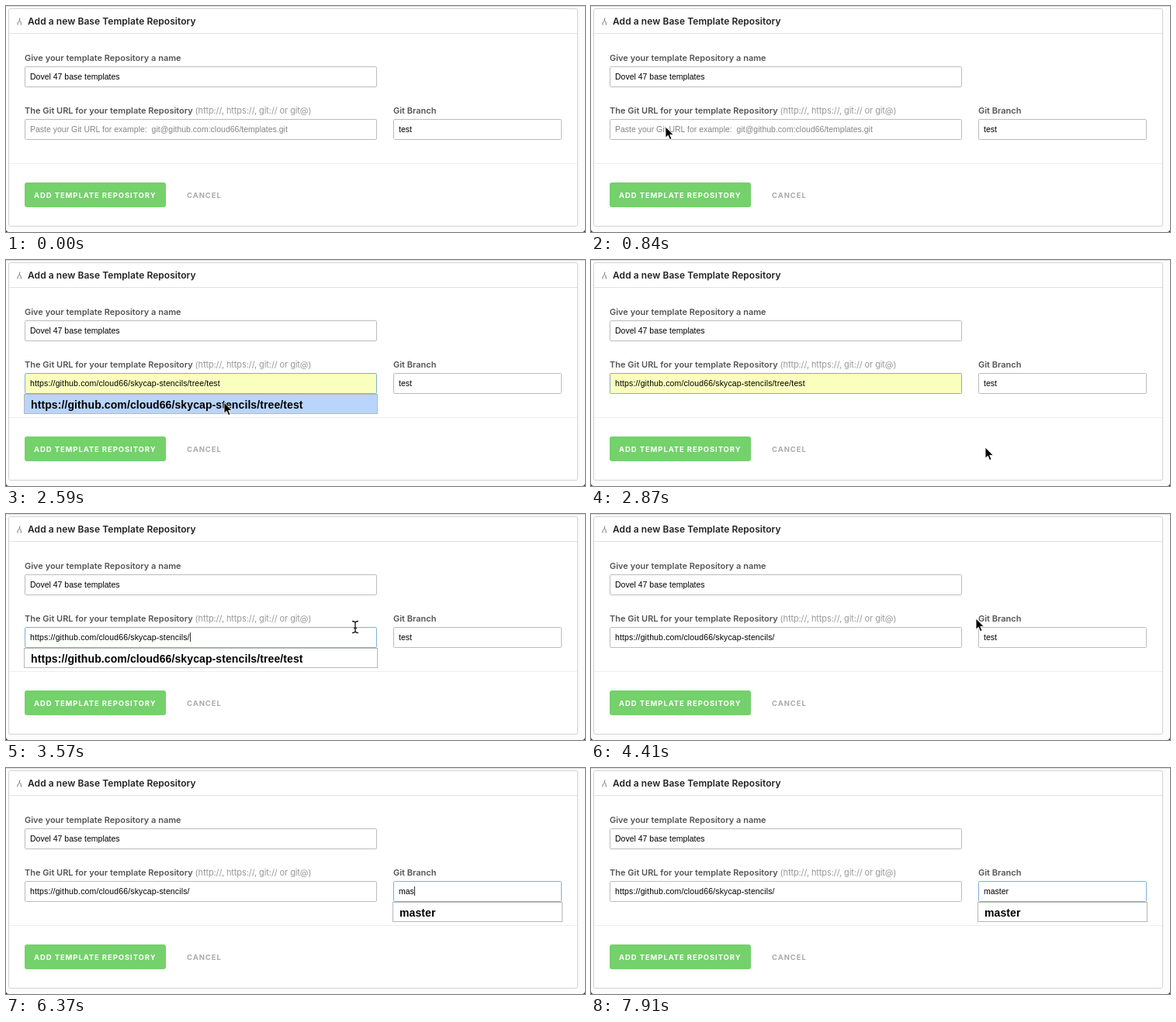
An HTML page for the animation above (8 s loop, 746x292 px).

```html
<!DOCTYPE html>
<html lang="en">
<head>
<meta charset="utf-8">
<title>Add a new Base Template Repository</title>
<style>
  html, body { margin: 0; width: 100%; height: 100%; overflow: hidden; background: #fff; }
  svg { display: block; }
  text { white-space: pre; }
  .title { font: 600 12px Inter, sans-serif; letter-spacing: .06px; fill: #222; }
  .label { font: 600 11px Inter, sans-serif; fill: #555; }
  .hint { font-weight: 400; letter-spacing: -.1px; fill: #999; }
  .value { font: 10.5px "Liberation Sans", Arial, sans-serif; fill: #000; }
  .option { font: bold 14px "Liberation Sans", Arial, sans-serif; letter-spacing: .1px; }
  .button { font: 700 9.5px Inter, sans-serif; letter-spacing: .9px; }
  .field { fill: #fff; stroke: #bcbcbc; }
  .focus { stroke: #82addb; }
</style>
</head>
<body>
<svg width="746" height="292" viewBox="0 0 746 292">
  <rect width="746" height="292" fill="#fcfcfc"/>
  <path d="M0 .5H746" stroke="#ddd"/>
  <path d="M0 288V292H4Q0 292 0 288ZM746 288V292H742Q746 292 746 288Z" fill="#333"/>
  <rect x="3.5" y="3.5" width="733" height="281" rx="2" fill="#fff" stroke="#d2d2d2"/>
  <path d="M4 35.5H736" stroke="#e0e0e0"/>
  <path d="M4 203.5H736" stroke="#eee"/>
  <path d="M15 24.5V22Q17.5 20 18 15.5M17.5 18.5Q19.5 20 19.5 24.5" fill="none" stroke="#777"/>
  <text class="title" x="28" y="24">Add a new Base Template Repository</text>

  <text class="label" x="24" y="71">Give your template Repository a name</text>
  <rect class="field" x="24.5" y="78.5" width="453" height="26" rx="1"/>
  <text class="value" x="31" y="95">Dovel 47 base templates</text>

  <text class="label" x="24" y="139">The Git URL for your template Repository <tspan class="hint">(http://, https://, git:// or git@)</tspan></text>
  <text class="label" x="499" y="139">Git Branch</text>
  <g id="url"></g>
  <g id="branch"></g>

  <rect x="24" y="228" width="182" height="32" rx="3" fill="#74d16b"/>
  <text class="button" x="36" y="248" fill="#fff">ADD TEMPLATE REPOSITORY</text>
  <text class="button" x="233" y="248" fill="#aaa" font-weight="600">CANCEL</text>

  <circle id="ring" r="22" fill="none" stroke="#000" stroke-opacity=".55" stroke-width="2"/>
  <path id="arrow" d="M0 0V14.2L3.3 11.2L5.6 16.6L8 15.6L5.7 10.4H10.2Z" stroke="#fff" stroke-width=".9"/>
  <path id="beam" d="M-4 -7.5Q0 -7.5 0 -5Q0 -7.5 4 -7.5M0 -5V5M-4 7.5Q0 7.5 0 5Q0 7.5 4 7.5M-2 1.5H2" fill="none" stroke="#222" stroke-width="1.4"/>
</svg>
<script>
const LOOP = 8000, STEP = 70;
const $ = id => document.getElementById(id);
const show = (node, on) => node.setAttribute("visibility", on ? "visible" : "hidden");
const within = (t, spans) => spans.some(([from, to]) => t >= from && t < to);
const latest = (t, steps) => steps.reduce((value, [from, next]) => t >= from ? next : value, "");

const BASE = "https://github.com/cloud66/skycap-stencils/";
const FULL = BASE + "tree/test";

function makeInput(id, left, width, spacing) {
  const group = $(id);
  group.innerHTML = `
    <rect class="field" x="${left + .5}" y="146.5" width="${width - 1}" height="26" rx="1"/>
    <rect x="${left + 7}" y="152" height="14" fill="#b3d7fe"/>
    <text class="value" x="${left + 7}" y="163"></text>
    <rect y="153" width="1" height="12" fill="#333"/>
    <g><rect x="${left - .5}" y="173.5" width="${width + 1}" height="25" stroke="#b8b8b8"/>
    <text class="option" x="${left + 8}" y="192"></text></g>`;
  const [box, selection, text, caret, list] = group.children;
  const [row, option] = list.children;

  return s => {
    box.setAttribute("class", s.focus ? "field focus" : "field");
    box.style.fill = s.preview ? "#faffbd" : "#fff";
    text.textContent = s.value || s.placeholder || "";
    text.style.fill = s.value ? "#000" : "#858585";
    text.style.letterSpacing = s.value ? spacing + "px" : "0";
    const length = s.value ? text.getComputedTextLength() : 0;
    selection.setAttribute("width", s.selected ? length : 0);
    caret.setAttribute("x", Math.round(left + 7 + length));
    show(caret, s.caret);
    show(list, s.option);
    option.textContent = s.option || "";
    row.setAttribute("fill", s.hover ? "#b9d5fb" : "#fff");
  };
}

const drawUrl = makeInput("url", 24, 454, .14);
const drawBranch = makeInput("branch", 499, 217, 0);

// time, x, y
const path = [
  [70, 357, 284], [210, 250, 226], [350, 110, 150], [420, 51, 132], [560, 98, 161],
  [770, 97, 158], [840, 96, 156], [2450, 96, 156], [2590, 281, 184], [2660, 300, 186],
  [2730, 390, 210], [2870, 508, 242], [3010, 500, 110], [3080, 475, 20], [3220, 450, 146],
  [3570, 450, 146], [3850, 481, 130], [4340, 481, 130], [4410, 496, 135], [4620, 515, 160]
];

function cursorAt(t) {
  const i = path.findIndex(p => p[0] > t);
  if (i < 0) return path[path.length - 1].slice(1);
  if (!i) return path[0].slice(1);
  const [t0, x0, y0] = path[i - 1], [t1, x1, y1] = path[i];
  const k = (t - t0) / (t1 - t0);
  return [x0 + (x1 - x0) * k, y0 + (y1 - y0) * k];
}

function urlValue(t) {
  if (t < 2520) return "";
  const erased = Math.min(9, Math.max(0, Math.ceil((t - 3290) / STEP * 2.25)));
  return FULL.slice(0, FULL.length - erased);
}

function draw(t) {
  drawUrl({
    value: urlValue(t),
    placeholder: "Paste your Git URL for example:  git@github.com:cloud66/templates.git",
    focus: within(t, [[1120, 4130]]),
    caret: within(t, [[1190, 1540], [2030, 2170], [3290, 4060]]),
    preview: within(t, [[2520, 3360]]),
    option: within(t, [[2170, 2730], [3360, 3990]]) && FULL,
    hover: within(t, [[2520, 2730]])
  });
  drawBranch({
    value: latest(t, [[0, "test"], [5880, "m"], [6020, "ma"], [6370, "mas"],
                      [7070, "mast"], [7210, "maste"], [7420, "master"]]),
    focus: t >= 4690,
    selected: within(t, [[4830, 5880]]),
    caret: within(t, [[4690, 4830], [5880, 6860], [7070, 7910]]),
    option: latest(t, [[5040, "test"], [5880, "master"]])
  });

  const [x, y] = cursorAt(t);
  const visible = within(t, [[70, 5880]]);
  const isBeam = within(t, [[3220, 3710], [4550, 5880]]);
  for (const id of ["ring", "arrow", "beam"]) $(id).setAttribute("transform", `translate(${x} ${y})`);
  show($("arrow"), visible && !isBeam);
  show($("beam"), isBeam);
  show($("ring"), within(t, [[980, 1120], [2660, 2730], [3220, 3290], [3920, 4060], [4690, 4760], [4830, 4900]]));
}

const start = performance.now();
function tick() {
  const t = (performance.now() - start) % LOOP;
  draw(Math.floor(t / STEP) * STEP);
  requestAnimationFrame(tick);
}
tick();
</script>
</body>
</html>
```
